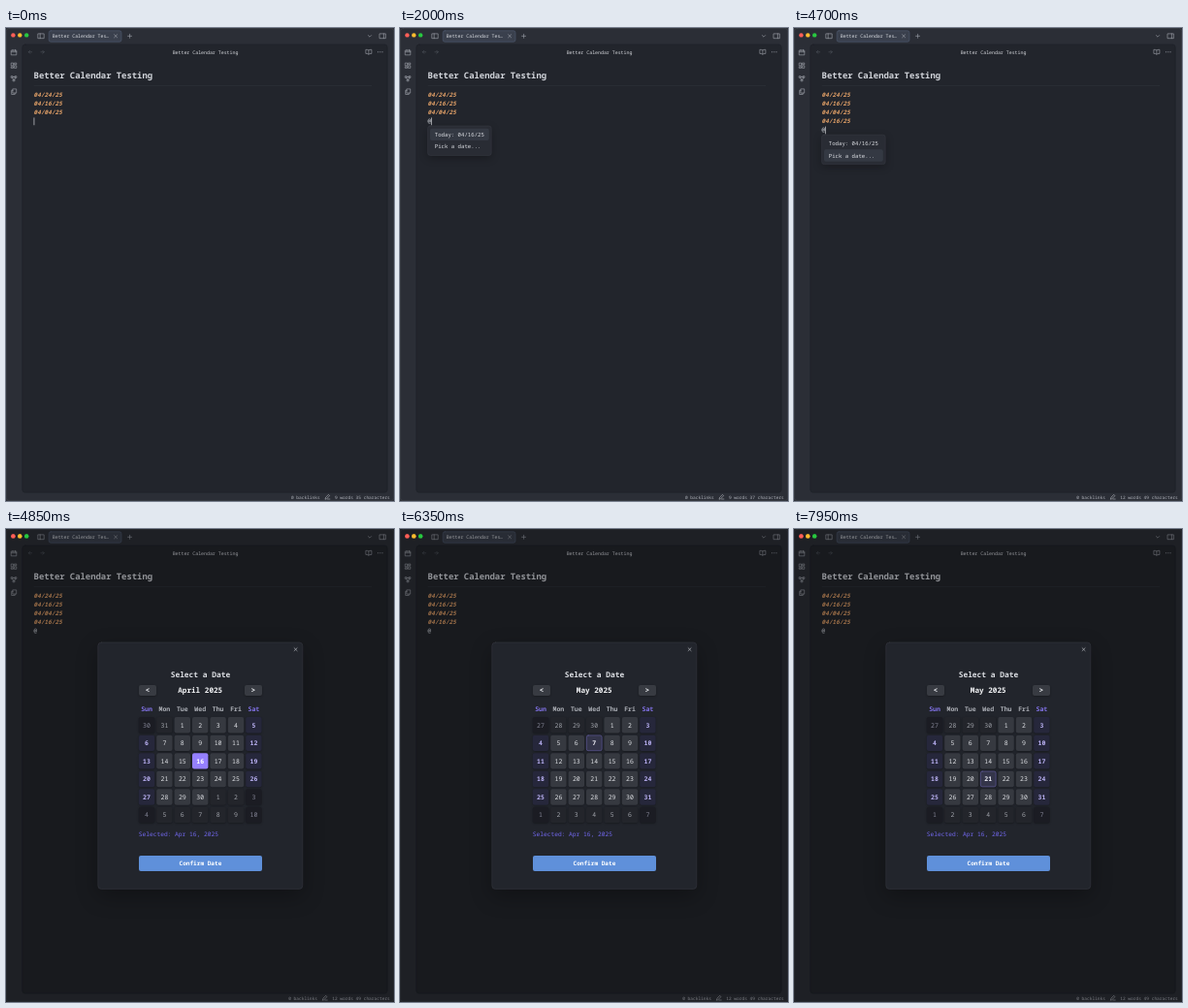
Recreate the animation shown at these times as an HTML page with a canvas. Size 400 by 488 pixels, loop 8000 ms.

```html
<!DOCTYPE html>
<html lang="en">
<head>
<meta charset="utf-8">
<title>Calendar note</title>
<style>
html, body { margin: 0; width: 100%; height: 100%; overflow: hidden; background: #2b2e36; }
canvas { display: block; width: 400px; height: 488px; }
</style>
</head>
<body>
<canvas id="stage"></canvas>
<script>
const LOOP = 8000, BLINK = 570, STATUS_DELAY = 200;
const MONO = '"Noto Sans Mono", "DejaVu Sans Mono", monospace';
const LEFT = 28.6, LINE = 9.15, CHAR = 3.66;
const WEEKDAYS = ['Sun', 'Mon', 'Tue', 'Wed', 'Thu', 'Fri', 'Sat'];
const MONTHS = { 3: 'April', 4: 'May' };
const DATES = ['04/24/25', '04/16/25', '04/04/25'];
const FOUR = [...DATES, '04/16/25'];

// Editor states; each key press also restarts the caret blink.
const EDITS = [
  { at: -STATUS_DELAY - 1, lines: DATES, words: 9, chars: 35 },
  { at: 0, lines: [...DATES, ''], words: 9, chars: 36 },
  { at: 850, lines: [...DATES, '@'], words: 9, chars: 37, pick: 0 },
  { at: 2050, lines: FOUR, words: 12, chars: 47 },
  { at: 2850, lines: [...FOUR, ''], words: 12, chars: 48 },
  { at: 3650, lines: [...FOUR, '@'], words: 12, chars: 49, pick: 0 },
  { at: 4550, lines: [...FOUR, '@'], words: 12, chars: 49, pick: 1 }
];
const MODAL_AT = 4800;
const WEEK_STEPS = [5250, 5600, 6000, 6500, 7050];

const canvas = document.getElementById('stage');
const ctx = canvas.getContext('2d');
const ratio = window.devicePixelRatio || 1;
canvas.width = 400 * ratio;
canvas.height = 488 * ratio;
ctx.scale(ratio, ratio);
ctx.textRendering = 'geometricPrecision';
ctx.lineCap = ctx.lineJoin = 'round';

function text(str, x, y, size, color, style = '500', align = 'left') {
  ctx.font = `${style} ${size}px ${MONO}`;
  ctx.fillStyle = color;
  ctx.textAlign = align;
  ctx.fillText(str, x, y);
}

function box(x, y, w, h, r, fill, stroke, shadow = 0) {
  ctx.save();
  ctx.beginPath();
  ctx.roundRect(x, y, w, h, r);
  if (shadow) {
    ctx.shadowColor = 'rgba(0,0,0,.3)';
    ctx.shadowBlur = shadow * ratio;
    ctx.shadowOffsetY = shadow * ratio / 3;
  }
  if (fill) { ctx.fillStyle = fill; ctx.fill(); }
  ctx.shadowColor = 'transparent';
  if (stroke) { ctx.strokeStyle = stroke; ctx.lineWidth = 0.6; ctx.stroke(); }
  ctx.restore();
}

function icon(path, x, y, color = '#a4a8b1') {
  ctx.save();
  ctx.translate(x, y);
  ctx.strokeStyle = color;
  ctx.lineWidth = 0.6;
  ctx.stroke(new Path2D(path));
  ctx.restore();
}

function dot(x, y, r, color) {
  ctx.fillStyle = color;
  ctx.beginPath();
  ctx.arc(x, y, r, 0, 7);
  ctx.fill();
}

function trafficLights() {
  ['#ff5f57', '#febc2e', '#28c840'].forEach((color, i) => dot(7.4 + i * 6.9, 7.4, 2.2, color));
}

const rect = (x, y, w, h) => `M${x} ${y}h${w}v${h}h${-w}z`;
const ICONS = {
  panel: rect(-3, -2.4, 6, 4.8) + 'M-1 -2.4v4.8',
  panelRight: rect(-3, -2.4, 6, 4.8) + 'M1 -2.4v4.8',
  close: 'M-1.5 -1.5l3 3M1.5 -1.5l-3 3',
  plus: 'M-2 0h4M0 -2v4',
  chevron: 'M-1.6 -.8l1.6 1.6 1.6 -1.6',
  back: 'M1.7 0h-3.4M-.2 -1.5l-1.5 1.5 1.5 1.5',
  forward: 'M-1.7 0h3.4M.2 -1.5l1.5 1.5 -1.5 1.5',
  book: 'M0 -1.7v4.1q-1 -.8 -3 -.7v-4.1q2.2 -.1 3 .7q.8 -.8 3 -.7v4.1q-2 -.1 -3 .7',
  calendar: rect(-2.6, -2.1, 5.2, 4.7) + 'M-2.6 -.5h5.2M-1.2 -2.9v1.4M1.2 -2.9v1.4',
  grid: rect(-2.6, -2.6, 2, 2.8) + rect(.6, -2.6, 2, 1.6) + rect(-2.6, 1.2, 2, 1.4) + rect(.6, .2, 2, 2.4),
  graph: rect(-2.7, -2.5, 1.6, 1.6) + rect(1.1, -2.5, 1.6, 1.6) + rect(-.8, 1, 1.6, 1.6) + 'M-1.9 -.9l1.5 1.9M1.9 -.9l-1.5 1.9M-1.1 -1.7h2.2',
  copy: rect(-1, -2.8, 3.5, 4.2) + 'M-1 -1.4h-1.5v4.2h3.5v-1.4',
  pencil: 'M-2.2 2l.5 -1.7 2.9 -2.8 1.2 1.2 -2.9 2.8zM.2 2.1h2.4'
};

function drawWindow() {
  box(0, 0, 400, 488, 0, '#2b2e36');
  box(0.3, 0.3, 399.4, 487.4, 3, null, '#41444b');
  box(16.8, 17, 376.4, 462.2, 3, '#22252c', '#1e2127');
  trafficLights();
  icon(ICONS.panel, 36.2, 8.3);
  box(44.2, 2.8, 74.8, 11.4, 2, '#3a404d', '#505c72');
  text('Better Calendar Tes…', 47.8, 10.1, 4.88, '#dddfe4');
  icon(ICONS.close, 113.1, 8.3);
  icon(ICONS.plus, 127.6, 8.3);
  icon(ICONS.chevron, 375, 8.4);
  icon(ICONS.panelRight, 388.4, 8.3);
  ['calendar', 'grid', 'graph', 'copy'].forEach((name, i) => icon(ICONS[name], 8.2, 25.2 + i * 13.5));
  icon(ICONS.back, 25, 24.8, '#50545d');
  icon(ICONS.forward, 37.6, 24.8, '#50545d');
  text('Better Calendar Testing', 205.5, 26.6, 4.92, '#d9dbe0', '500', 'center');
  icon(ICONS.book, 373.9, 24.7);
  for (const x of [383.6, 385.8, 388]) dot(x, 24.8, 0.55, '#a4a8b1');
}

function drawNote(edit, caretOn) {
  text('Better Calendar Testing', LEFT, 52.3, 8.88, '#d2d5db', '700');
  ctx.fillStyle = '#2e3239';
  ctx.fillRect(LEFT, 59, 348.5, 0.6);
  const baseline = i => 71 + i * LINE;
  edit.lines.forEach((line, i) => {
    if (line === '@') text(line, LEFT, baseline(i) - 0.4, 6.1, '#d6d9df');
    else text(line, LEFT, baseline(i), 6.1, '#e2a067', 'italic 600');
  });
  const last = edit.lines.length - 1;
  if (caretOn) {
    ctx.fillStyle = '#d0d2d6';
    ctx.fillRect(LEFT + edit.lines[last].length * CHAR, baseline(last) - 6, 0.7, 7.8);
  }
  if (edit.pick !== undefined) drawSuggestions(baseline(last) + 2.6, edit.pick);
}

function drawSuggestions(top, pick) {
  box(28.6, top, 65.6, 30.4, 2.5, '#292c34', '#363a42', 8);
  ['Today: 04/16/25', 'Pick a date...'].forEach((label, i) => {
    const y = top + 2.6 + i * 12.5;
    if (i === pick) box(31, y, 60.8, 12.4, 2, '#343943');
    text(label, 35.8, y + 8.3, 5.68, '#dcdee3');
  });
}

function drawStatus({ words, chars }) {
  const label = `${words} words ${chars} characters`;
  text(label, 395.8, 485.5, 4.53, '#b2b5bd', '500', 'right');
  const left = 395.8 - ctx.measureText(label).width;
  icon(ICONS.pencil, left - 7.6, 483.9, '#b2b5bd');
  text('0 backlinks', left - 15.2, 485.5, 4.53, '#b2b5bd', '500', 'right');
}

function drawDay(date, col, row, month, focus) {
  const x = 145 + col * 18.4, y = 202.3 + row * 18.55;
  const weekend = col % 6 === 0, inside = date.getMonth() === month;
  const key = date.getTime();
  let fill, color, border, style = '500';
  if (key === new Date(2025, 3, 16).getTime()) {
    [fill, color, style] = ['#9580ff', '#ffffff', '700'];
  } else if (key === focus.getTime()) {
    [fill, color, border, style] = ['#34354a', '#f0f0f8', '#625b9e', '700'];
  } else if (weekend) {
    [fill, color] = inside ? ['#26273b', '#b9b0f2'] : ['#1b1c23', '#838495'];
    if (inside) style = '600';
  } else {
    [fill, color] = inside ? ['#363940', '#dfe1e5'] : ['#23252b', '#9fa2a9'];
  }
  box(x - 8.2, y - 8.2, 16.4, 16.4, 2, fill, null, 2);
  if (border) box(x - 7.9, y - 7.9, 15.8, 15.8, 1.8, null, border);
  text(date.getDate(), x, y + 2.35, 6.5, color, style, 'center');
}

function drawModal(t) {
  ctx.fillStyle = 'rgba(0,0,0,.31)';
  ctx.fillRect(0, 0, 400, 488);
  trafficLights();
  box(94.8, 117, 211, 254.4, 3.5, '#22252c', '#34373e', 22);
  icon(ICONS.close, 298.6, 124.2, '#c6c9cf');
  text('Select a Date', 200.4, 152.6, 7.88, '#dfe1e6', '600', 'center');

  const focus = new Date(2025, 3, 16 + 7 * WEEK_STEPS.filter(at => t >= at).length);
  const month = focus.getMonth();
  [['<', 137], ['>', 246]].forEach(([label, x]) => {
    box(x, 161, 18, 11, 2, '#383b42', null, 2);
    text(label, x + 9, 169.4, 8, '#e4e6ea', '700', 'center');
  });
  text(`${MONTHS[month]} 2025`, 200.2, 169.4, 7.67, '#f2f3f5', '700', 'center');

  WEEKDAYS.forEach((name, i) => {
    const weekend = i % 6 === 0;
    text(name, 145 + i * 18.4, 188.2, 6.5, weekend ? '#8575ee' : '#aeb1b8', '600', 'center');
  });
  const first = 1 - new Date(2025, month, 1).getDay();
  for (let i = 0; i < 42; i++) {
    drawDay(new Date(2025, month, first + i), i % 7, Math.floor(i / 7), month, focus);
  }
  text('Selected: Apr 16, 2025', 136.8, 317, 6.22, '#7268ee');
  box(137, 337, 127, 16, 2, '#5f90da');
  text('Confirm Date', 200.4, 347.4, 6.08, '#ffffff', '700', 'center');
}

const editAt = t => EDITS.filter(e => e.at <= t).pop();

function frame(now) {
  const t = now % LOOP;
  const edit = editAt(t), modal = t >= MODAL_AT;
  const caretOn = !modal && (t - edit.at) % (2 * BLINK) < BLINK;
  drawWindow();
  drawNote(modal ? { ...edit, pick: undefined } : edit, caretOn);
  drawStatus(editAt(t - STATUS_DELAY));
  if (modal) drawModal(t);
}

const start = performance.now();
function tick() {
  frame(performance.now() - start);
  requestAnimationFrame(tick);
}
tick();
</script>
</body>
</html>
```
